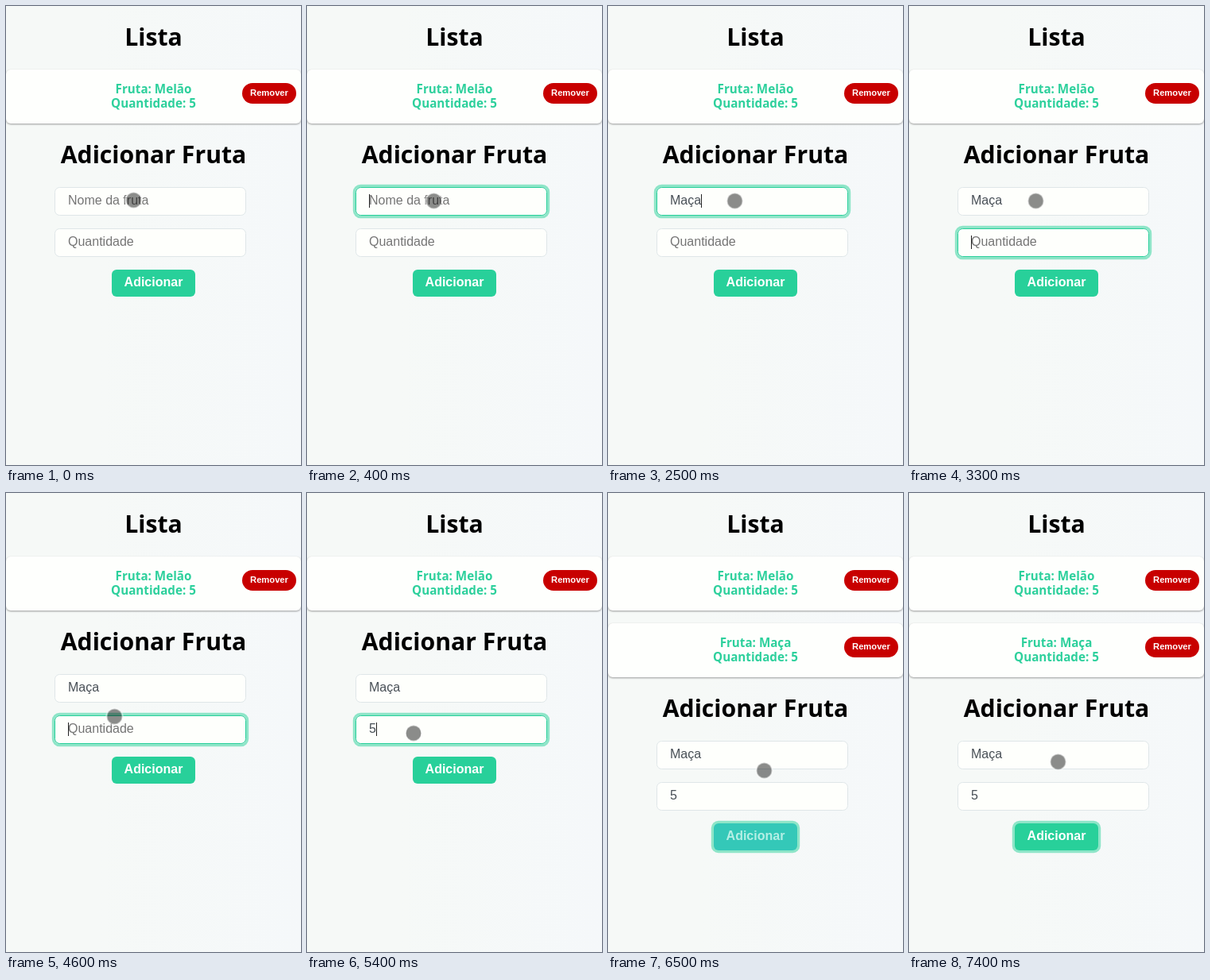
These frames come from a looping animation (371 by 578 pixels, 8 s). An HTML page:

```html
<!DOCTYPE html>
<html lang="pt">
<head>
<meta charset="utf-8">
<title>Lista</title>
<style>
html, body { margin: 0; width: 100%; height: 100%; overflow: hidden; background: #f6f9f8; }
svg { display: block; }
text { font: 16px "Liberation Sans", Arial, sans-serif; }
.title, .item { font-family: "Noto Sans", "Open Sans", sans-serif; font-weight: 700; text-anchor: middle; }
.title { font-size: 30.2px; }
.item { font-size: 15.2px; fill: #2dd09c; }
.card { fill: #fefffd; filter: drop-shadow(0 1px 1px rgba(0,0,0,.38)); }
.remove { fill: #c80000; }
.label { font-weight: 700; fill: #fff; text-anchor: middle; }
.small { font-size: 11.2px; }
.field { fill: #fefffc; stroke: #dfe6e8; }
.hint { fill: #757575; }
.typed { fill: #495057; }
.glow rect { fill: none; stroke: #28d09a; }
.glow .halo { stroke: #8ee5c8; stroke-width: 3.2; }
.btn { fill: #28d09a; }

/* Everything runs on one 8 s loop; 1% = 80 ms */
.anim { animation: 8s step-end infinite; }
#form { animation-name: push; }
#added { animation-name: added; }
#focus1 { animation-name: focus1; }
#focus2 { animation-name: focus2; }
#focusBtn { animation-name: added; }
#hint1 { animation-name: hint1; }
#hint2 { animation-name: hint2; }
#k1 { animation-name: key1; }
#k2 { animation-name: key2; }
#k3 { animation-name: key3; }
#k4 { animation-name: key4; }
#qty { animation-name: qty; }
#btn { animation-name: press; }
#btnText { animation-name: pressText; }
#caret { animation-name: caretMove, caretBlink; }
#pointer { animation-name: pointer; }

@keyframes push { 0% { transform: none; } 81.25%, 100% { transform: translateY(84px); } }
@keyframes added { 0% { opacity: 0; } 81.25%, 100% { opacity: 1; } }
@keyframes focus1 { 0% { opacity: 0; } 3.75% { opacity: .6; } 5% { opacity: 1; } 41.25%, 100% { opacity: 0; } }
@keyframes focus2 { 0% { opacity: 0; } 41.25% { opacity: 1; } 81.25%, 100% { opacity: 0; } }
@keyframes hint1 { 0% { opacity: 1; } 21.25%, 100% { opacity: 0; } }
@keyframes hint2 { 0% { opacity: 1; } 67.5%, 100% { opacity: 0; } }
@keyframes key1 { 0% { fill-opacity: 0; } 21.25%, 100% { fill-opacity: 1; } }
@keyframes key2 { 0% { fill-opacity: 0; } 23.75%, 100% { fill-opacity: 1; } }
@keyframes key3 { 0% { fill-opacity: 0; } 26.25%, 100% { fill-opacity: 1; } }
@keyframes key4 { 0% { fill-opacity: 0; } 31.25%, 100% { fill-opacity: 1; } }
@keyframes qty { 0% { opacity: 0; } 67.5%, 100% { opacity: 1; } }
@keyframes press {
  0% { fill: #28d09a; } 81.25% { fill: #34c8b8; } 82.5% { fill: #2ecca9; } 83.75%, 100% { fill: #28d09a; }
}
@keyframes pressText {
  0% { fill: #fff; } 81.25% { fill: #b5efe5; } 82.5% { fill: #daf7f2; } 83.75%, 100% { fill: #fff; }
}
@keyframes caretMove {
  0% { transform: translate(78px, 237px); }
  21.25% { transform: translate(91px, 237px); }
  23.75% { transform: translate(100px, 237px); }
  26.25% { transform: translate(108px, 237px); }
  31.25% { transform: translate(117px, 237px); }
  41.25% { transform: translate(78px, 289px); }
  67.5%, 100% { transform: translate(87px, 289px); }
}
@keyframes caretBlink {
  0%, 10%, 37.5%, 47.5%, 60%, 75%, 100% { opacity: 0; }
  3.75%, 16.25%, 41.25%, 53.75%, 66.25% { opacity: 1; }
}
@keyframes pointer {
  0% { transform: translate(160.5px, 244.5px); }
  1.25% { transform: translate(159.5px, 245.5px); }
  55% { transform: translate(156px, 251px); }
  56.25% { transform: translate(146px, 267px); }
  57.5% { transform: translate(136.5px, 281.5px); }
  58.75% { transform: translate(134px, 295px); }
  60% { transform: translate(134px, 302.5px); }
  71.25% { transform: translate(176px, 325px); }
  72.5% { transform: translate(212.5px, 343.5px); }
  75% { transform: translate(204px, 348px); }
  76.25% { transform: translate(196.5px, 349.5px); }
  91.25% { transform: translate(191px, 343px); }
  92.5%, 100% { transform: translate(187.5px, 338.5px); }
}
</style>
</head>
<body>
<svg width="371" height="578" viewBox="0 0 371 578">
  <defs>
    <linearGradient id="bg">
      <stop offset=".3" stop-color="#f6f9f7"/>
      <stop offset="1" stop-color="#f5f8fa"/>
    </linearGradient>
    <g id="card">
      <rect class="card" y="80" width="371" height="68" rx="6"/>
      <rect class="remove" x="297" y="97" width="68" height="26" rx="13"/>
      <text class="label small" x="331" y="113">Remover</text>
      <text class="item" x="185.5" y="128">Quantidade: 5</text>
    </g>
    <rect id="box" x="61.5" y="228.5" width="240" height="35" rx="6"/>
    <g id="glow" class="glow">
      <rect class="halo" x="59.4" y="226.4" width="244.2" height="39.2" rx="8"/>
      <rect x="61.5" y="228.5" width="240" height="35" rx="6"/>
    </g>
  </defs>

  <rect width="371" height="578" fill="url(#bg)"/>
  <text class="title" x="185.5" y="50">Lista</text>
  <use href="#card"/>
  <text class="item" x="185.5" y="110">Fruta: Melão</text>
  <g id="added" class="anim">
    <use href="#card" y="84"/>
    <text class="item" x="185.5" y="194">Fruta: Maça</text>
  </g>

  <g id="form" class="anim">
    <text class="title" x="185.5" y="198">Adicionar Fruta</text>

    <use href="#box" class="field"/>
    <g id="focus1" class="anim"><use href="#glow"/></g>
    <text id="hint1" class="hint anim" x="78" y="250">Nome da fruta</text>
    <text class="typed" x="78" y="250"><tspan id="k1" class="anim">M</tspan><tspan id="k2" class="anim">a</tspan><tspan id="k3" class="anim">ç</tspan><tspan id="k4" class="anim">a</tspan></text>

    <use href="#box" y="52" class="field"/>
    <g id="focus2" class="anim"><use href="#glow" y="52"/></g>
    <text id="hint2" class="hint anim" x="78" y="302">Quantidade</text>
    <text id="qty" class="typed anim" x="78" y="302">5</text>

    <rect id="caret" class="anim" width="1" height="17" fill="#222"/>

    <rect id="focusBtn" class="anim" x="129.8" y="328.8" width="111.4" height="40.4" rx="9" fill="#8ee5c8"/>
    <rect id="btn" class="btn anim" x="133" y="332" width="105" height="34" rx="6"/>
    <text id="btnText" class="label anim" x="185.5" y="353">Adicionar</text>
  </g>

  <g id="pointer" class="anim">
    <circle r="10.2" fill="none" stroke="#fff" stroke-opacity=".55" stroke-width="1.6"/>
    <circle r="9.5" fill="#000" fill-opacity=".45"/>
  </g>
</svg>
</body>
</html>
```
